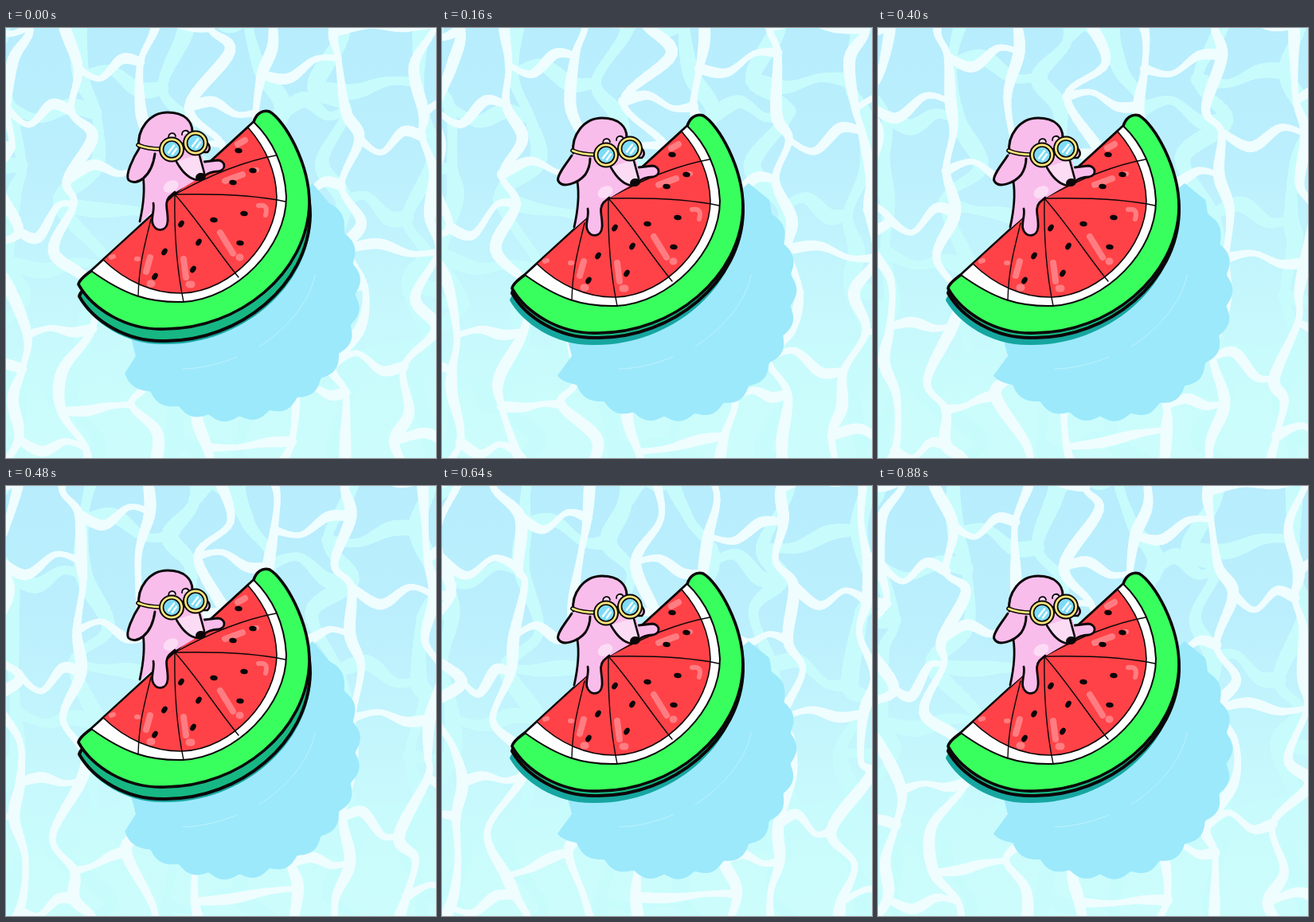
These frames come from a looping animation (540 px wide and 540 px high, 0.96 s). An HTML page with a canvas:

```html
<!DOCTYPE html>
<html lang="en">
<head>
<meta charset="utf-8">
<title>Melon float</title>
<style>
  html, body { margin: 0; width: 100%; height: 100%; overflow: hidden; background: #c4f5fc; }
  canvas { display: block; width: 540px; height: 540px; }
</style>
</head>
<body>
<canvas id="pool" width="540" height="540"></canvas>
<script>
const ctx = document.getElementById('pool').getContext('2d');
const SIZE = 540, STEP = 80, STEPS = 12, TAU = Math.PI * 2;
const INK = '#0b0608', PINK = '#f9bdec', PALE = '#fcdcf5', GOLD = '#fbe57a', SHINE = '#ff7d82';

const noise = n => {
  const v = Math.sin(n * 127.1 + 11.7) * 43758.5453;
  return v - Math.floor(v);
};
const lerp = (a, b, t) => a + (b - a) * t;

// Catmull-Rom point between b and c.
const blend = (a, b, c, d, t) => 0.5 * (2 * b + (c - a) * t +
  (2 * a - 5 * b + 4 * c - d) * t * t + (3 * b - a - 3 * c + d) * t * t * t);

function brush(points, width, seed, angle) {
  const at = i => points[Math.max(0, Math.min(points.length - 1, i))];
  const cuts = 8;
  let last = points[0];
  for (let j = 1; j <= (points.length - 1) * cuts; j++) {
    const i = Math.floor((j - 1) / cuts);
    const next = [0, 1].map(n => blend(at(i - 1)[n], at(i)[n], at(i + 1)[n], at(i + 2)[n], j / cuts - i));
    ctx.lineWidth = width * (1 + 0.3 * Math.sin(j / cuts * 2.1 + seed + angle));
    ctx.beginPath();
    ctx.moveTo(...last);
    ctx.lineTo(...next);
    ctx.stroke();
    last = next;
  }
}

// Wavy strands joined by staggered links; every node circles once per loop.
function ripples({ color, width, cell, seed }, angle) {
  const rise = cell * 0.55, cols = Math.ceil(SIZE / cell) + 1, rows = Math.ceil(SIZE / rise) + 1;
  const node = (i, j) => {
    const id = seed + i * 31 + j * 7.3, turn = angle + noise(id) * TAU;
    return [
      (i + (noise(id + 1) - 0.5) * 0.55) * cell + 8 * Math.cos(turn),
      (j + (noise(id + 2) - 0.5) * 0.5) * rise + 8 * Math.sin(turn)
    ];
  };
  ctx.strokeStyle = color;
  for (let i = 0; i <= cols; i++) {
    brush(Array.from({ length: rows + 2 }, (_, j) => node(i, j - 1)), width, seed + i * 2, angle);
    for (let j = 0; j <= rows; j++) {
      if ((i + j) % 3) continue;
      const a = node(i - 1, j), b = node(i, j), bow = (noise(seed + i + j * 5) - 0.5) * 40;
      const bend = (t, s) => [lerp(a[0], b[0], t), lerp(a[1], b[1], t) + bow * s];
      brush([a, bend(0.35, 1), bend(0.7, -0.4), b], width * 0.9, i + j, angle);
    }
  }
}

const layers = [
  { color: '#c8fcfc', width: 17, cell: 104, seed: 40 },
  { color: '#effdff', width: 11.5, cell: 86, seed: 3 }
];

function shape(d, fill, line = 0, color = INK) {
  const path = new Path2D(d);
  if (fill) { ctx.fillStyle = fill; ctx.fill(path); }
  if (line) { ctx.lineWidth = line; ctx.strokeStyle = color; ctx.stroke(path); }
}

function oval(x, y, rx, ry, turn, fill, line = 0) {
  ctx.beginPath();
  ctx.ellipse(x, y, rx, ry, turn, 0, TAU);
  ctx.fillStyle = fill;
  ctx.fill();
  if (line) { ctx.lineWidth = line; ctx.strokeStyle = INK; ctx.stroke(); }
}

function shifted([x, y], paint) {
  ctx.save();
  ctx.translate(x, y);
  paint();
  ctx.restore();
}

const earDown = 'M168,150 C160,162 149,185 154,191 C163,199 183,188 187,158';
const earUp = 'M165,153 C158,164 145,179 148,185 C153,195 173,188 182,177 C187,169 188,164 188,157';

// Bobbing: float and dog offsets, side depth and wet edge below the float.
const poses = [
  { melon: [0, 0], dog: [0, 0], depth: [1, 15], wet: [2, 19], ear: earDown },
  { melon: [0, 3], dog: [-3, 4], depth: [2, 10], wet: [-1, 19], ear: earUp },
  { melon: [-3, 5], dog: [-2, 7], depth: [0, 6], wet: [-3, 15], ear: earUp }
];

// Scalloped arc on the water.
function drawShade(phase) {
  ctx.beginPath();
  ctx.moveTo(385, 195);
  for (let u = 0; u <= 1; u += 0.005) {
    const a = lerp(-0.76, 2.53, u);
    const r = 152 + 15 * (2 * u - 1) ** 4 + 7 * Math.abs(Math.sin(u * 13 * Math.PI + phase));
    ctx.lineTo(285 + r * Math.cos(a), 335 + r * Math.sin(a));
  }
  ctx.lineTo(163, 412);
  ctx.lineTo(156, 385);
  ctx.fillStyle = '#9ce9fb';
  ctx.fill();
  shape('M388,310 C382,345 350,380 318,400 M290,413 C268,422 245,428 222,428', null, 0.8, 'rgba(225,250,255,.6)');
}

const rind = 'M311,118 C314,108 322,102 331,105 C350,116 381,170 381,220 C379,308 292,378 200,378 C150,380 108,352 91,322 C92,316 100,310 107,305 Z';
const seeds = '292,154 310,179 285,194 299,233 261,241 220,246 242,269 199,281 294,270 235,303 187,312'
  .split(' ').map(p => p.split(',').map(Number));

function drawMelon({ melon, depth, wet }) {
  shifted(melon, () => {
    shifted(wet, () => shape(rind, '#16a6a0'));
    shifted(depth, () => shape(rind, '#17b783', 4));
    shape(rind, '#39ff5e', 3.6);
    shape('M107,305 C150,336 180,345 222,344 C290,340 352,275 352,212 C350,172 334,140 311,118 Z', '#fff', 2);
    shape('M122,291 C150,318 185,334 222,333 C285,330 340,268 340,212 C339,178 324,148 304,125 Z', '#ff4247', 1.6);

    shape('M181,288 L176,306 M223,290 L226,313 M269,257 L285,283 M275,192 L297,184 M291,146 L300,141', null, 8, SHINE);
    shape('M317,223 C328,221 328,228 326,235 M313,178 h2 M164,290 h2 M132,288 l3,-1', null, 6, SHINE);
    shape('M181,321 h2 M230,322 h3 M293,288 h1', null, 9, SHINE);

    shape('M182,240 C175,270 167,295 166,337 M212,209 C211,260 216,310 223,344 M212,209 C240,240 265,280 292,313 M212,209 C260,208 310,209 351,218 M212,209 C250,188 295,168 339,160', null, 1.4);
    seeds.forEach(([x, y]) => oval(x, y, 4.7, 3.2, x > 250 ? 0.1 : -1, INK));
  });
}

function drawLens(x, y) {
  oval(x, y, 15, 15, 0, GOLD, 2);
  oval(x, y, 10.5, 10.5, 0, '#7edcf6', 1.6);
  shape(`M${x - 4},${y + 4} l7,-9 M${x + 1},${y + 6} l5,-7`, null, 2.6, '#f2fdff');
}

function drawBand(d, width) {
  shape(d, null, width + 3);
  shape(d, null, width, GOLD);
}

function drawDog({ dog, ear }) {
  shifted(dog, () => {
    shape('M246,142 C254,142 259,150 253,156 L244,156', PINK, 2.5);
    shape('M240,168 L266,166 C276,167 277,178 267,180 C258,180 250,184 243,188 Z', PINK);
    shape('M249,168 L266,166 C276,167 277,178 267,180 C258,180 253,183 248,186', null, 2.8);

    shape('M170,152 C176,200 172,225 168,245 L184,231 L184,243 C185,257 202,257 203,243 C203,230 198,220 205,211 L243,188 L225,150 Z', PINK);
    oval(207, 199, 10, 7, -0.5, PALE);
    shape('M172,186 C175,205 172,225 168,243 M185,220 C187,228 182,238 184,245 C187,257 202,256 203,243 C204,230 198,220 205,212 L212,206', null, 2.8);

    shape('M167,152 C164,128 180,106 203,106 C225,106 234,118 236,135 L246,160 C249,170 252,182 247,188 C240,193 228,190 214,172 L180,175 Z', PINK);
    shape('M167,150 C164,128 180,106 203,106 C225,106 234,118 234,130', null, 3);
    shape('M214,168 C221,180 229,190 241,191 L249,184 L243,158 Z', PALE);
    shape('M214,168 C221,180 229,190 241,191 M243,160 L249,182', null, 2.6);
    oval(244.5, 187, 6.5, 5, -0.2, INK);
    shape(ear, PINK, 3);
    shape('M204,138 C204,131 212,130 213,136 M221,134 C221,128 228,127 230,132', PALE, 1.8);

    drawBand('M166,147 C175,151 184,152 195,152', 2.6);
    drawBand('M219,148 L227,146', 3.5);
    drawLens(208, 152.5);
    drawLens(238, 144.5);
  });
}

const sky = ctx.createLinearGradient(0, 0, 0, SIZE);
sky.addColorStop(0, '#b7edfd');
sky.addColorStop(0.3, '#bbeffd');
sky.addColorStop(0.85, '#cbfcfc');
sky.addColorStop(1, '#ccfdfc');

function draw(k) {
  const pose = poses[k % poses.length], angle = k / STEPS * TAU;
  ctx.lineCap = ctx.lineJoin = 'round';
  ctx.fillStyle = sky;
  ctx.fillRect(0, 0, SIZE, SIZE);
  layers.forEach(layer => ripples(layer, angle));
  drawShade(k % poses.length);
  drawMelon(pose);
  drawDog(pose);
}

const start = performance.now();
let shown = -1;
function tick() {
  const k = Math.floor((performance.now() - start) / STEP) % STEPS;
  if (k !== shown) draw(shown = k);
  requestAnimationFrame(tick);
}
tick();
</script>
</body>
</html>
```
